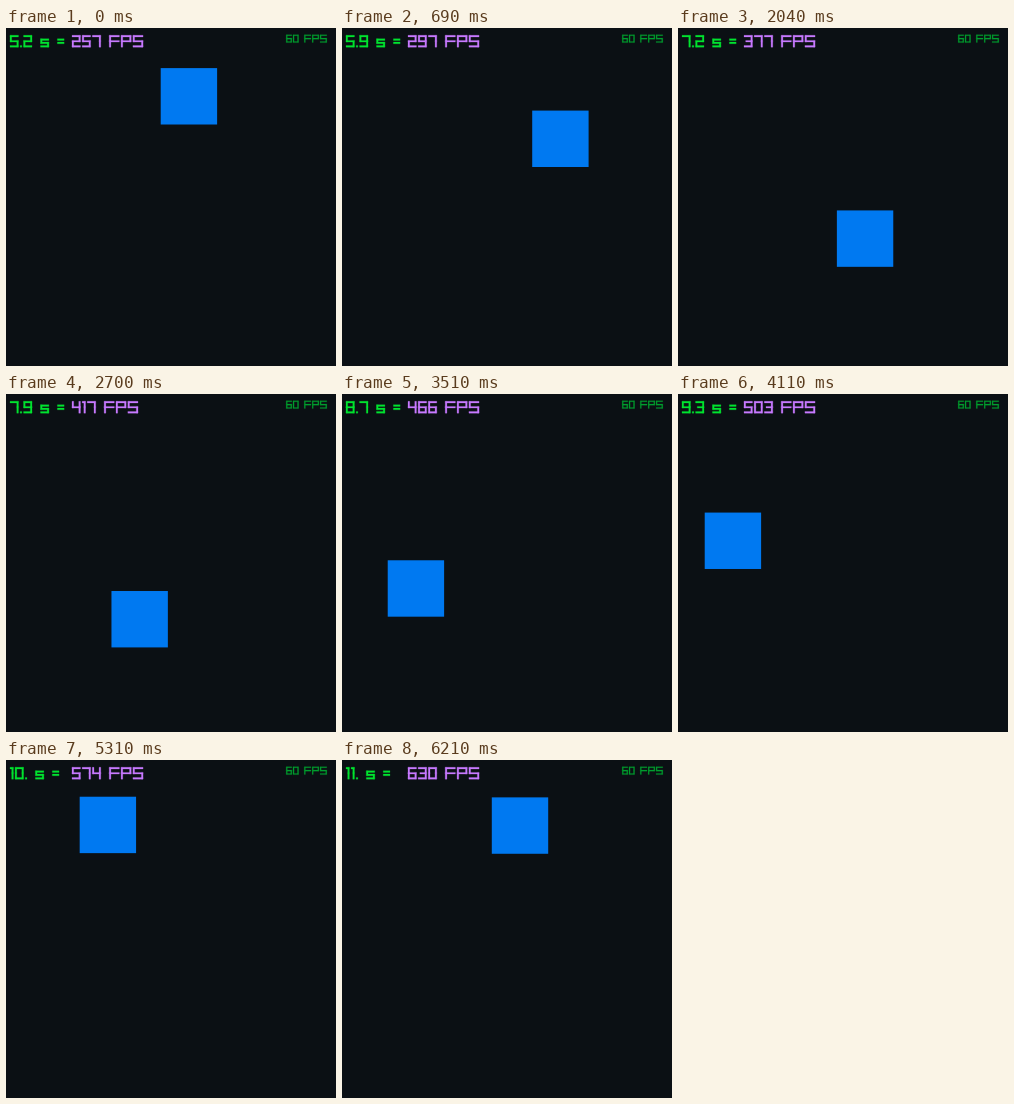
Recreate the animation shown at these times as an HTML page. Size 330 by 338 pixels, loop 6.24 s.

```html
<!DOCTYPE html>
<html lang="en">
<head>
<meta charset="utf-8">
<title>Orbiting square</title>
<style>
  html, body { margin: 0; width: 100%; height: 100%; overflow: hidden; background: #0b1014; }
  svg { display: block; width: 100%; height: 100%; }
  path { stroke: currentColor; fill: currentColor; stroke-width: .14; }
  text { font: 10px "Liberation Mono", monospace; fill: transparent; }
</style>
</head>
<body>
<svg viewBox="0 0 330 338">
  <rect width="330" height="338" fill="#0b1014"/>
  <rect id="square" width="56.4" height="56.4" fill="#0079f1"/>
  <g id="clock" transform="translate(4 7.3) scale(1.692)" color="#00e430"><path/><text y="7"/></g>
  <g id="counter" transform="translate(66 7.3) scale(1.692)" color="#c87aff"><path/><text y="7"/></g>
  <g id="rate" transform="translate(280.2 6.7) scale(1.128)" color="#009e2f"><path/><text y="7"/></g>
</svg>
<script>
const LOOP = 6240, STEP = 30;
const START_SECONDS = 5.254, START_COUNT = 257;
const ORBIT = { x: 139.3, y: 140.8, radius: 84.6 };
const HALF = 28.2;

// The counter runs near 60 per second; these points carry its uneven pace.
const PACE = [[0, START_COUNT], [1410, 339], [4110, 503], [5310, 574], [6210, 630]];

// Bars of a seven-segment cell; "m" is a middle bar that leaves out the left edge.
const BARS = {
  a: (w, top) => bar(0, top, w, 1),
  b: (w, top, mid) => bar(w - 1, top, 1, mid - top + 1),
  c: (w, top, mid) => bar(w - 1, mid, 1, 7 - mid),
  d: w => bar(0, 6, w, 1),
  e: (w, top, mid) => bar(0, mid, 1, 7 - mid),
  f: (w, top, mid) => bar(0, top, 1, mid - top + 1),
  g: (w, top, mid) => bar(0, mid, w, 1),
  m: (w, top, mid) => bar(1, mid, w - 1, 1)
};
const bar = (x, y, w, h) => `m${x} ${y}h${w}v${h}h${-w}z`;

const glyph = (names, width = 5, top = 0) => ({
  width,
  bars: [...names].map(name => BARS[name](width, top, (top + 6) / 2))
});
const glyphs = {
  " ": glyph("", 3), ".": glyph("d", 1), "=": glyph("ag", 4, 2),
  s: glyph("afgcd", 5, 2),
  F: glyph("aefg", 6), P: glyph("abefg", 6), S: glyph("afgcd", 6)
};
"abcdef abc abged abcdm fgbc afgcd afgedc abc abcdefg abcdfg".split(" ")
  .forEach((names, n) => glyphs[n] = glyph(names, n === 1 ? 2 : 5));

function write(id, string) {
  const [path, text] = document.getElementById(id).children;
  if (text.textContent === string) return;
  let pen = 0, d = "";
  for (const char of string) {
    const { width, bars } = glyphs[char];
    for (const shape of bars) d += `M${pen} 0${shape}`;
    pen += width + 1;
  }
  path.setAttribute("d", d);
  text.textContent = string;
}

function countAt(ms) {
  const i = Math.max(1, PACE.findIndex(([end]) => ms <= end));
  const [t0, n0] = PACE[i - 1], [t1, n1] = PACE[i];
  return Math.floor(n0 + (n1 - n0) * (ms - t0) / (t1 - t0));
}

const square = document.getElementById("square");

function draw(ms) {
  const count = countAt(Math.floor(ms % LOOP / STEP) * STEP);
  const seconds = START_SECONDS + (count - START_COUNT) / 60;
  square.setAttribute("x", ORBIT.x + ORBIT.radius * Math.cos(seconds) - HALF);
  square.setAttribute("y", ORBIT.y + ORBIT.radius * Math.sin(seconds) - HALF);
  write("clock", seconds.toFixed(3).slice(0, 3) + " s =");
  write("counter", count + " FPS");
}

write("rate", "60 FPS");
draw(0);
const begin = performance.now();
(function tick() {
  draw(performance.now() - begin);
  requestAnimationFrame(tick);
})();
</script>
</body>
</html>
```
